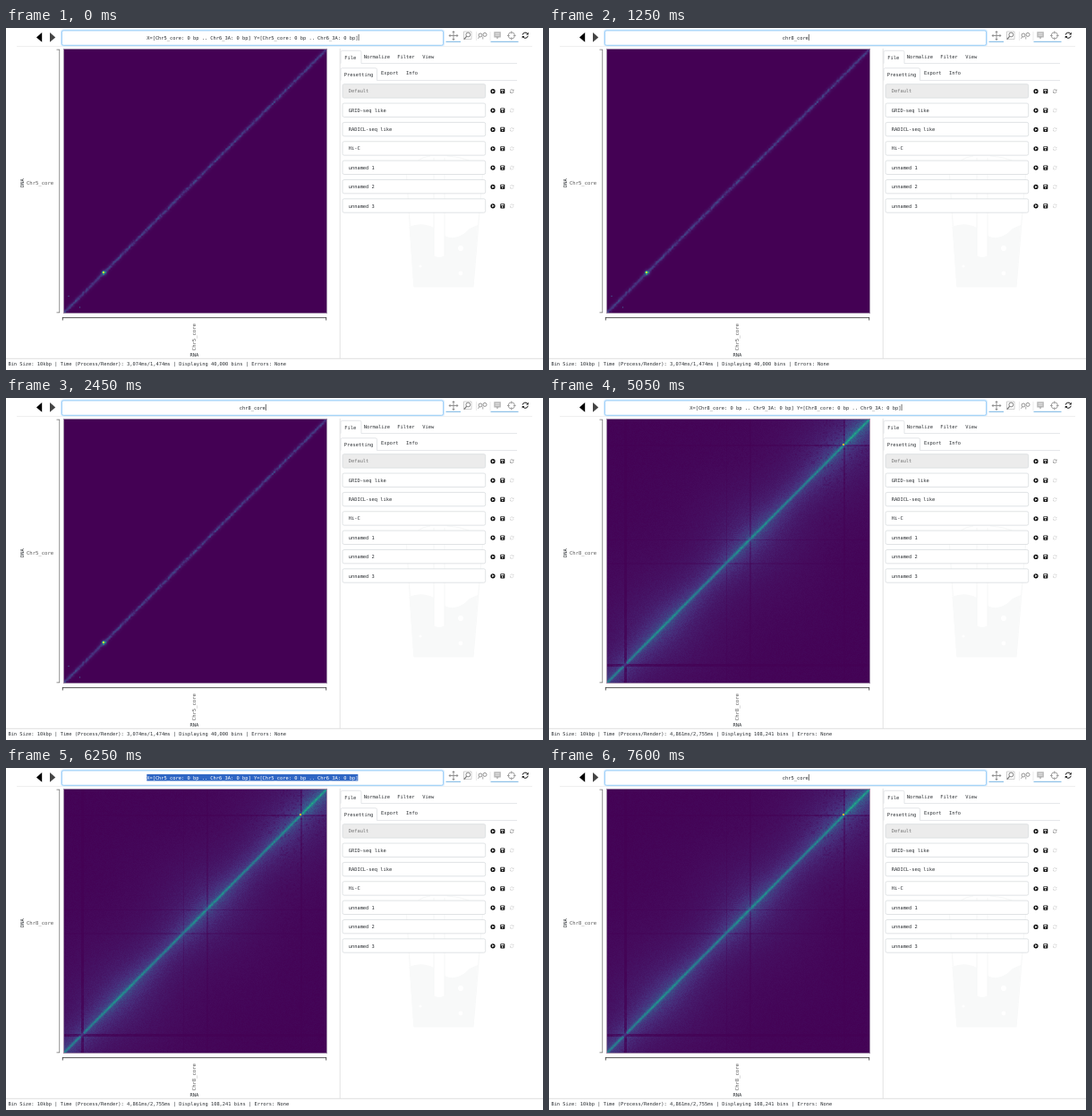
Recreate the animation shown at these times as an HTML page with a canvas. Size 600 by 382 pixels, loop 8 s.

```html
<!DOCTYPE html>
<html lang="en">
<head>
<meta charset="utf-8">
<title>Heatmap browser</title>
<style>
html, body { margin: 0; width: 100%; height: 100%; overflow: hidden; background: #fff; }
canvas { position: absolute; left: 65px; top: 24px; }
svg { position: absolute; left: 0; top: 0; }
text { font: 5.38px "DejaVu Sans Mono", "Noto Sans Mono", monospace; fill: #2b2f33;
  text-rendering: geometricPrecision; white-space: pre; }
text.axis { font-size: 5.55px; fill: #5a5a5a; }
</style>
</head>
<body>
<canvas id="sparse" width="293" height="294"></canvas>
<canvas id="dense" width="293" height="294"></canvas>
<svg id="ui" width="600" height="382" viewBox="0 0 600 382"></svg>
<script>
const NS = 'http://www.w3.org/2000/svg';
const ui = document.getElementById('ui');
const byId = id => document.getElementById(id);

function add(tag, attrs, content) {
  const node = document.createElementNS(NS, tag);
  for (const key in attrs) node.setAttribute(key, attrs[key]);
  if (content !== undefined) node.textContent = content;
  ui.appendChild(node);
  return node;
}
const label = (x, y, str, attrs = {}) => add('text', { x, y, ...attrs }, str);
const box = (x, y, width, height, attrs) => add('rect', { x, y, width, height, ...attrs });
const shape = (d, fill) => add('path', { d, fill });
const line = (d, stroke, width = 1) =>
  add('path', { d, fill: 'none', stroke, 'stroke-width': width });
const ring = (cx, cy, r, stroke, width) =>
  add('circle', { cx, cy, r, fill: 'none', stroke, 'stroke-width': width });
const dot = (cx, cy, r, fill) => add('circle', { cx, cy, r, fill });

// Heatmaps
const stops = [[68, 1, 84], [71, 44, 122], [59, 82, 139], [44, 113, 142], [33, 145, 140],
  [39, 173, 129], [94, 201, 98], [170, 220, 50], [253, 231, 37]];

function viridis(v) {
  const p = Math.max(0, Math.min(0.9999, v)) * 8;
  const i = Math.floor(p);
  return stops[i].map((c, k) => c + (stops[i + 1][k] - c) * (p - i));
}

function hash(x, y) {
  let h = Math.imul(x + 17, 374761393) ^ Math.imul(y + 29, 668265263);
  h = Math.imul(h ^ (h >>> 13), 1274126177);
  return ((h ^ (h >>> 16)) >>> 0) / 4294967296;
}

function paint(id, field) {
  const ctx = byId(id).getContext('2d');
  const img = ctx.createImageData(293, 294);
  for (let y = 0; y < 294; y++) {
    for (let x = 0; x < 293; x++) {
      const [r, g, b] = viridis(field(x, y));
      img.data.set([r, g, b, 255], (y * 293 + x) * 4);
    }
  }
  ctx.putImageData(img, 0, 0);
  return ctx;
}

const offset = (x, y) => Math.abs(x + 0.5 - 293 + (y + 0.5) * 293 / 294) / Math.SQRT2;

const sparse = paint('sparse', (x, y) => {
  const d = offset(x, y), n = hash(x >> 1, y >> 1);
  const near = Math.hypot(x - 44, y - 249);
  return 0.09 * Math.exp(-d * d / 1.6) * (0.7 + 0.6 * n)
    + 0.09 * Math.exp(-d * d / 7) * (0.4 + 0.8 * n)
    + 0.16 * Math.exp(-near * near / 9);
});
sparse.fillStyle = '#2a8a86';
sparse.fillRect(42, 248, 5, 2);
sparse.fillRect(43, 247, 2, 5);
sparse.fillStyle = '#c2df3a';
sparse.fillRect(43, 248, 2, 2);
sparse.fillStyle = '#433a7d';
sparse.fillRect(4, 275, 2, 1);
sparse.fillRect(17, 287, 1, 2);

// Gaps: position along the axis, half width, strength
const gaps = [[0.068, 1.3, 0.85], [0.454, 0.8, 0.4], [0.544, 0.9, 0.5], [0.903, 0.9, 0.6]];
const dense = paint('dense', (x, y) => {
  const d = offset(x, y), n = hash(x, y);
  const u = x / 293, w = 1 - y / 294, mid = (u + w) / 2;
  const domain = 0.9 + 0.12 * Math.sin(mid * 19 - 2.6) + (u > 0.903 && w > 0.903 ? 0.35 : 0);
  let v = 0.14 * Math.exp(-d / 9) * domain + 0.11 * Math.exp(-d / 42) * domain;
  v *= 0.82 + 0.36 * n;
  v += 0.012 * hash(x + 400, y);
  for (const [pos, half, depth] of gaps) {
    const across = Math.min(Math.abs(u - pos), Math.abs(w - pos)) * 293;
    if (across < half) v *= 1 - depth * (0.7 + 0.3 * hash(x >> 1, y >> 1));
  }
  if ((u > 0.82 && u < 0.92 || w > 0.82 && w < 0.92) && hash(x >> 1, y >> 1) > 0.88) v *= 0.75;
  const dim = Math.abs(mid - 0.068) < 0.006 ? 0.45 : 1;
  return v + 0.23 * dim * Math.exp(-d * d / 2.2) * (0.85 + 0.3 * hash(x >> 1, y >> 1));
});
dense.fillStyle = '#e5b535';
dense.fillRect(263, 27, 2, 2);
box(64.5, 23.5, 294, 295, { fill: 'none', stroke: '#a08aa8', 'stroke-width': 1 });

// Toolbar
line('M12 20.5H588', '#e8e8e8', 0.7);
shape('M40.2 5V15.8L34 10.4Z', '#000');
shape('M49 5V15.8L55.2 10.4Z', '#444');
box(61, 1.6, 429, 19, { rx: 3, fill: '#d8ecfd' });
box(62.4, 2.9, 426.2, 16.4, { rx: 2, fill: '#fff', stroke: '#86c5f6', 'stroke-width': 0.8 });

const grey = '#8b8b8b';
line('M495.5 8.5H504.5M500 4V13', grey, 0.9);
for (let a = 0; a < 360; a += 90)
  add('path', { d: 'M500 3l1.7 2h-3.4z', fill: grey, transform: `rotate(${a} 500 8.5)` });
line('M511.5 12.5V4H520V12.5Z', '#bbb', 0.7);
ring(516.3, 7.5, 2.4, '#777', 0.9);
line('M514.6 9.3L511.8 12.6', '#777', 1.3);
line('M525.5 4V14M541 4V14', '#ddd', 0.6);
ring(530, 8, 2, '#888', 0.9);
ring(535, 7.4, 2, '#888', 0.9);
line('M528.7 9.8L527.5 12M532.8 9.6V12.5', '#999', 0.9);
shape('M545.3 4.2H552.8V10.4H550.4L549 12.6L547.6 10.4H545.3Z', '#b5b5b5');
line('M546.6 6.2H551.5M546.6 8.2H551.5', '#fff', 0.7);
ring(564.8, 8.4, 3.6, grey, 0.8);
line('M564.8 3.5V6.4M564.8 10.4V13.3M559.9 8.4H562.8M566.8 8.4H569.7', grey, 0.8);
line('M491.5 15.3H508M541.5 15.3H572.5', '#74b2e2', 1);

function refresh(x, y, s, color) {
  const g = { transform: `translate(${x} ${y}) scale(${s})` };
  add('path', { ...g, d: 'M-3 -.6A3.1 3.1 0 0 1 2.4 -2M3 .6A3.1 3.1 0 0 1 -2.4 2',
    fill: 'none', stroke: color, 'stroke-width': 1 });
  add('path', { ...g, d: 'M3.5 -3.4V-.7H.8ZM-3.5 3.4V.7H-.8Z', fill: color });
}
refresh(580.2, 8.2, 1, '#111');

// Axes
line('M59.7 24V318M56.5 24.2H60M56.5 317.8H60', '#777', 0.8);
line('M63 323.6H358M63.3 323V326.5M357.7 323V326.5', '#444', 0.9);
const yName = label(23, 175.2, '', { class: 'axis' });
const xName = label(0, 0, '', { class: 'axis', transform: 'translate(211.6 360.2) rotate(-90)' });
label(0, 0, 'DNA', { transform: 'translate(20.2 178) rotate(-90)', 'font-style': 'italic' });
label(205.6, 366.6, 'RNA', { 'font-style': 'italic' });

// Faint glass behind the panel
line('M447 157L456 289H522L533 157M455 156Q459 145 474 143M493 143Q520 145 528 156', '#f7f8f8', 1.2);
shape('M450.5 222Q464 216 478 223V254Q484 258 490 254V232Q504 239 518 224L527 220L522 289H455.5Z', '#f8f9f9');
line('M478 145V254M490 145V254', '#f5f6f6', 1);
for (const [x, y, r] of [[508, 246, 3], [508, 274, 2.4], [463, 266, 1.6]]) dot(x, y, r, '#fff');

// Panel
line('M373.2 23V369', '#dcdcdc', 0.8);
line('M0 369.3H600', '#d6d6d6', 0.8);
const rule = '#dcdfe2';
line('M374 39.6V27Q374 25.3 375.7 25.3H395.3Q397 25.3 397 27V39.6H571', rule, 0.8);
line('M374 58.6V46.5Q374 44.8 375.7 44.8H412.8Q414.5 44.8 414.5 46.5V58.6H571', rule, 0.8);
label(378.3, 35, 'File');
label(399.8, 33.7, 'Normalize');
label(437.2, 33.7, 'Filter');
label(465.2, 33.7, 'View');
label(377.8, 53.6, 'Presetting');
label(419, 52.2, 'Export');
label(447, 52.2, 'Info');

const presets = ['Default', 'GRID-seq like', 'RADICL-seq like', 'Hi-C',
  'unnamed 1', 'unnamed 2', 'unnamed 3'];
presets.forEach((name, i) => {
  const y = 70.4 + i * 21.35;
  box(376, y - 7.7, 159.7, 15.4, { rx: 1.8, fill: i ? '#fff' : '#ececec',
    stroke: '#d9dcdf', 'stroke-width': 0.8 });
  const text = label(382.7, y + 2, name);
  if (!i) text.style.fill = '#777';
  dot(544, y + 0.3, 2.6, '#111');
  shape(`M543.2 ${y - 1.2}v3l2.4 -1.5z`, '#fff');
  box(552.3, y - 2.3, 5, 5.2, { rx: 0.7, fill: '#111' });
  box(553.2, y - 1.6, 2.9, 1.4, { fill: '#fff' });
  dot(554.8, y + 1.4, 0.8, '#fff');
  refresh(565.2, y + 0.3, 0.62, i ? '#ccc' : '#777');
});

// Parts that change
const select = box(157.3, 7, 236, 7.4, { fill: '#2f66c4' });
const query = label(275.3, 12.6, '', { 'text-anchor': 'middle' });
const caret = box(0, 7, 0.7, 7, { fill: '#333' });
const status = label(2.4, 377.4, '');

const range = (a, b) => ['X', 'Y'].map(k => `${k}=[Chr${a}_core: 0 bp .. Chr${b}_3A: 0 bp]`).join(' ');
// end time, query, selected, caret x, chromosome shown
const steps = [
  [500, range(5, 6), false, 393.7, 5],
  [1250, range(8, 9), true, 0, 5],
  [3250, 'chr8_core', false, 289.9, 5],
  [6250, range(8, 9), false, 393.7, 8],
  [7000, range(5, 6), true, 0, 8],
  [8000, 'chr5_core', false, 289.9, 8]
];
const stats = { 5: ['3,074ms/1,474ms', '40,000'], 8: ['4,861ms/2,755ms', '108,241'] };
const show = (node, on) => { node.style.display = on ? '' : 'none'; };

let current;
function draw(ms) {
  const step = steps.find(s => ms % 8000 < s[0]);
  if (step === current) return;
  current = step;
  const [, text, selected, caretX, chr] = step;
  query.textContent = text;
  query.style.fill = selected ? '#fff' : '';
  show(select, selected);
  show(caret, !selected);
  caret.setAttribute('x', caretX);
  show(byId('sparse'), chr === 5);
  show(byId('dense'), chr === 8);
  xName.textContent = yName.textContent = `Chr${chr}_core`;
  const [time, bins] = stats[chr];
  status.textContent =
    `Bin Size: 10kbp | Time (Process/Render): ${time} | Displaying ${bins} bins | Errors: None`;
}

const start = performance.now();
function tick() {
  draw(performance.now() - start);
  requestAnimationFrame(tick);
}
tick();
</script>
</body>
</html>
```
